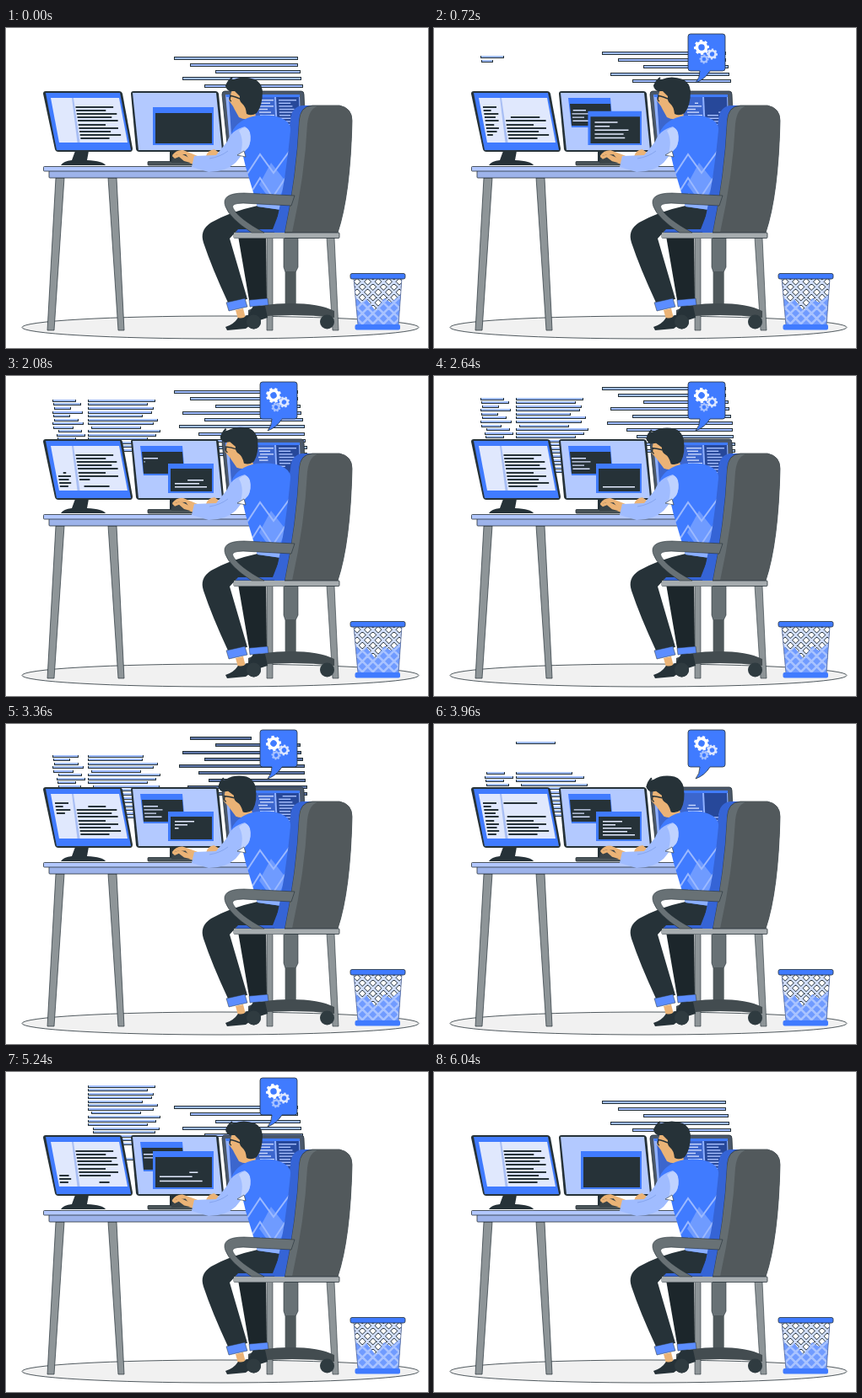
An HTML page with a canvas for the animation above (6.08 s loop, 500 by 380 pixels).

```html
<!DOCTYPE html>
<html>
<head>
<meta charset="utf-8">
<style>
html, body { margin: 0; width: 100%; height: 100%; overflow: hidden; background: #fff; }
canvas { display: block; }
</style>
</head>
<body>
<canvas id="stage" width="500" height="380"></canvas>
<script>
const c = document.getElementById('stage').getContext('2d');
const LOOP = 6080, HALF = LOOP / 2;
const DARK = '#263238', BLUE = '#407bff', PALE = '#a0bcff', SKIN = '#ebb376';
const clamp = v => Math.max(0, Math.min(1, v));
const ease = v => { v = clamp(v); return v * v * (3 - 2 * v); };
const ramp = (t, start, step, i) => clamp((t - start - i * step) / step);

function shape(d, fill, stroke, width = 0.8) {
  const p = new Path2D(d);
  if (fill) { c.fillStyle = fill; c.fill(p); }
  if (stroke) { c.strokeStyle = stroke; c.lineWidth = width; c.stroke(p); }
}
function rect(x, y, w, h, fill, r = 0, stroke) {
  c.beginPath();
  c.roundRect(x, y, w, h, r);
  c.fillStyle = fill;
  c.fill();
  if (stroke) { c.strokeStyle = stroke; c.lineWidth = 0.8; c.stroke(); }
}
function disc(x, y, r, fill) {
  c.beginPath();
  c.arc(x, y, r, 0, 7);
  c.fillStyle = fill;
  c.fill();
}
function clipped(d, draw) {
  c.save();
  c.clip(new Path2D(d));
  draw();
  c.restore();
}
function about(x, y, draw, angle = 0, scale = 1, dx = 0, dy = 0) {
  c.save();
  c.translate(x + dx, y + dy);
  c.rotate(angle);
  c.scale(scale, scale);
  c.translate(-x, -y);
  draw();
  c.restore();
}
// Old part of a line wiped from the left, new part typed from the left.
function codeLine(x, y, w, gone, typed, color, h = 1.7) {
  if (gone < 1) rect(x + w * gone, y, w * (1 - gone), h, color);
  if (typed > 0) rect(x, y, w * typed, h, color);
}

// Code floating up behind the screens
const wideRows = [[199, 346], [218, 346], [248, 349], [209, 350], [235, 352], [205, 354],
  [228, 354], [240, 355], [215, 357], [232, 357]];
const midEnds = [177, 168, 175, 173, 162, 180, 175, 160, 183, 178, 168, 182];
const sideEnds = [83, 89, 77, 91, 76, 86, 92, 80, 90, 94];

// Pixel-aligned bar: a crisp dark edge around a pale core.
function floatLine(x, y, w, h, fill) {
  if (w < 2) return;
  const top = Math.round(y - h / 2);
  w = Math.round(w);
  rect(x, top, w, h, DARK);
  rect(x + 1, h > 3 ? top + 1 : top, w - 2, h > 3 ? h - 2 : h - 1, fill);
}
function floatingCode(t) {
  const s = t > 3920 ? t - LOOP : t;
  const fill = s > 3000 ? '#5f76a8' : PALE;
  wideRows.forEach(([x, end], i) => {
    const typed = i < 5 ? ramp(s, -2080, 80, i) : ramp(s, 1500, 100, i - 5);
    const gone = ramp(s, 3260, 70, i);
    floatLine(x, 35.5 - 0.0079 * s + i * 8.25, (end - x) * typed * (1 - gone), 4, fill);
  });
  for (let i = 0; i < 20; i++) {
    const y = 37.5 - 0.0039 * t + i * 4.55;
    const gone = ramp(t, 2990, 118, i);
    const first = ramp(t, 880, 85, i) * (1 - gone);
    const second = ramp(t, 3910, 85, i) * (1 - ramp(t, 5240, 40, i));
    const x = 97 + (i % 8 == 7 ? 4 : 0) + (i > 10 ? 6 : 0);
    floatLine(x, y, (midEnds[i % 12] - x) * Math.max(first, second), 3, PALE);
    const sx = 55 + (i % 3) + (i > 7 ? 5 : 0);
    floatLine(sx, y, (sideEnds[i % 10] - sx) * ramp(t, 600, 85, i) * (1 - gone), 3, PALE);
  }
}

function stand(x) {
  about(0, 0, () => shape('M17 146H33L31 157Q50 158 53 163H0Q3 158 13 157Z', DARK), 0, 1, x);
}
function leftScreen(p) {
  stand(65);
  shape('M47 75H134Q137 75 138 78L150 143Q150 147 147 147H62Q59 147 58 144L44 78Q44 75 47 75Z', DARK);
  shape('M47 77H135L148 145H60Z', BLUE);
  shape('M53 83H134L144 136H63Z', '#e0e8fd');
  shape('M78 83H80L87.500 136H84.500Z', '#a9bff4');
  const right = [47, 37, 50, 43, 50, 34, 49, 39, 51, 36];
  const left = [16, 9, 17, 13, 16, 10, 15, 12, 14, 10];
  for (let i = 0; i < 10; i++) {
    const y = Math.round(93 + i * 4.1), skew = i * 0.65;
    codeLine(82.500 + skew, y, right[i] * 0.95, ramp(p, 0, 228, i), ramp(p, 760, 180, i), DARK, 2);
    const a = ramp(p, 1600, 85, i), b = ramp(p, 0, 85, i);
    if (b > a) rect(58 + skew + left[i] * a, y, left[i] * (b - a), 2, DARK);
  }
}
function middleScreen(t, p) {
  rect(194, 146, 13, 13, DARK);
  shape('M151 75H248Q251 75 252 78L258 143Q258 147 255 147H158Q155 147 154 144L148 78Q148 75 151 75Z', DARK);
  clipped('M150 77H249L256 145H157Z', () => {
    rect(148, 76, 110, 70, '#b3c9ff');
    if (t > 700 && t < 5700) {
      shape('M159 83H209L212 118H163Z', BLUE);
      shape('M161 90H209L211 116H163Z', DARK);
      [17, 22, 14, 20].forEach((w, i) =>
        codeLine(163 + i * 0.5, 97 + i * 4.2, w, ramp(p, 700, 200, i), ramp(p, 1900, 170, i), '#d8e2ff', 1.4));
    }
    const big = t < 2500 ? 1 - ease((t - 600) / 250) : ease((t - 4800) / 250);
    const x = 192 - 18 * big, y = 104 - 10 * big, w = 246 - x, h = 139 - y;
    rect(x, y, w, h, BLUE);
    rect(x + 3, y + 6 + big, w - 5, h - 8 - big, DARK);
    [23, 15, 34, 29, 38].forEach((len, i) => {
      const a = ramp(p, 1200, 360, i), b = ramp(p, 0, 150, i);
      const k = w / 54;
      if (b > a) rect(x + 8 + len * a * k, y + (11 + i * 4) * (h / 35), len * (b - a) * k, 1.5, '#e4ebff');
    });
  });
}
function backScreen(p) {
  shape('M259 75H350Q353 75 353 79L356 147H263L256 79Q256 75 259 75Z', '#4b586a', DARK);
  shape('M260 79H348L350 145H266Z', '#8fb0ff');
  shape('M260 79H348V82H261Z', BLUE);
  shape('M264 82H318L321 142H268Z', '#3c66cd');
  shape('M320 82H347L349 142H323Z', '#27489a');
  for (let i = 0; i < 12; i++) {
    const y = 85 + i * 3.6;
    codeLine(299 + i % 3, y, 18 - i * 5 % 8, ramp(p, 500, 130, i), ramp(p, 1700, 80, i), '#cbd9ff', 1.4);
    codeLine(323 + i * 0.2, y, 21 - i * 7 % 9, ramp(p, 300, 90, i), ramp(p, 1500, 90, i), '#a9c1ff', 1.4);
  }
}

function desk() {
  shape('M59 178H69L57 359H49Z', '#8e9598', DARK, 0.7);
  shape('M121 178H131L140 359H133Z', '#8e9598', DARK, 0.7);
  rect(51, 169.500, 260, 8.500, '#9db3ea', 1, DARK);
  rect(44.500, 164.500, 266, 5.500, '#b3c8ff', 1, DARK);
}
function bin() {
  const body = 'M412 297H469L465 353H417Z';
  const paper = 'M412 318L421 327L427 322L438 336L448 321L456 326L470 315V354H412Z';
  let mesh = '';
  for (let x = 341; x < 540; x += 12.5) mesh += `M${x} 295l60 60M${x} 295l-60 60`;
  clipped(body, () => {
    shape(mesh, null, DARK, 4);
    shape(mesh, null, '#d3e0ff', 2.6);
    clipped(paper, () => {
      rect(410, 310, 62, 45, '#709bff');
      shape(mesh, null, '#a9c3ff', 2.6);
    });
  });
  shape(body, null, '#53699c', 0.8);
  rect(408, 291.500, 65, 6.500, BLUE, 2, DARK);
  rect(413.500, 352, 53.500, 6.500, BLUE, 2);
}

function chairBack() {
  shape('M309 249H316V359H309Z', '#8e9598', DARK, 0.6);
  shape('M380 249H389L394 359H387Z', '#8e9598', DARK, 0.6);
  shape('M329 249H346V284L343 290V329H331V290L329 284Z', '#687175', DARK, 0.6);
  rect(331, 289, 12.500, 40, '#4f585b');
}
function chairFront() {
  shape('M272 243Q274 235 286 235L312 236L320 210L337 110Q338 93 352 92H368L340 243Z', '#3564d6');
  shape('M330 243Q344 175 347 111Q348 93 363 92H395Q410 95 410 110Q408 198 393 243Z', '#646d71', DARK, 0.7);
  shape('M339 243Q354 175 357 114Q359 94 372 92H395Q410 95 410 110Q408 198 393 243Z', '#52595c');
  rect(270, 243, 125, 6.500, '#a6acaf', 1, DARK);
  shape('M287 335Q303 327 337 327Q371 327 389 336V344Q340 338 287 344Z', '#434c50');
  disc(293.500, 349, 8.500, '#2f3b40');
  disc(380.500, 349, 8.500, '#2f3b40');
}
function armrest() {
  shape('M342 199L282 196Q254 196 260 212Q265 226 291 243H306Q275 226 269 214Q266 208 281 208L338 211Z', '#687175', DARK, 0.6);
}

function legs() {
  shape('M275 247H308L309 323H288Z', '#1c262b');
  shape('M293 330H307L310 344L285 352L284 346Z', DARK);
  shape('M298 211L326 213L316 239H275L265 250L286 322L263 326Q244 285 234 255Q229 240 243 231Q266 218 298 211Z', DARK);
  shape('M261 326L283 321L286 331L264 336Z', '#5c8dff', DARK, 0.5);
  shape('M288 323L310 321L311 329L289 331Z', '#5c8dff', DARK, 0.5);
  shape('M272 335L281 333L284 345L275 346Z', SKIN);
  shape('M260 355Q270 352 275 344Q281 346 285 341L297 342L292 351L284 357L262 359Z', DARK);
}
function torso() {
  const vest = 'M267 125Q274 108 297 104Q318 102 330 109Q339 114 338 128L326 216L298 212L284 165L278 140Z';
  shape(vest, BLUE);
  clipped(vest, () => {
    shape('M300 186L314 160L332 183L319 212Z', '#6f9bff');
    shape('M296 203L302 196L312 210L326 206V218H296Z', '#8bafff');
    shape('M284 176L301 150L317 172L336 146M288 199L301 178L316 201L335 172', null, '#9bb9ff', 2);
  });
}
function hands(t) {
  const beat = Math.sin(t * Math.PI / 190);
  about(246, 152, () => shape('M237 152Q239 145 247 144L255 150L245 155Z', SKIN), beat * 0.08);
  about(222, 158, () => {
    shape('M197 151Q202 144 210 145L227 152L222 162L209 157L199 156Z', SKIN);
    shape('M196 159Q197 151 204 150H213L219 158L220 160H196Z', '#3a4448');
    shape('M197 152L207 149L217 154L222 161L211 158L205 153L200 155Z', SKIN);
  }, beat * 0.05);
}
function arm() {
  shape('M283 117Q267 121 262 135L249 151L223 152L220 165L240 171Q260 171 272 160L288 140Q293 124 283 117Z', PALE);
  shape('M280 119Q286 116 289 124Q291 134 287 142L277 152Q283 134 276 122Z', '#bfd2ff');
  shape('M241 155Q254 153 263 146', null, '#7e9fea', 0.8);
  shape('M274 151L282 146L284 153Z', '#fff', DARK, 0.6);
}
function head(t) {
  const lean = ease((t - 1560) / 800) - ease((t - 4540) / 640);
  about(288, 104, () => {
    shape('M268 73L264 86L269 93L271 97L276 106Q285 111 296 105L291 80Z', SKIN);
    shape('M265 75Q257 70 262 66Q263 61 270 61Q281 56 295 61Q303 65 304 75Q304 92 297 101Q291 105 285 102Q284 93 280 90Q276 87 277 81L271 75Z', DARK);
    shape('M265 80L272 82L277 84M266 81Q264 86 267 87', null, DARK, 1.400);
    shape('M261 69Q263 63 268 59', null, DARK, 2.200);
  }, -0.14 * lean, 1, -4 * lean, 2 * lean);
}

function gear(x, y, r, color, angle) {
  about(x, y, () => {
    c.strokeStyle = color;
    c.lineWidth = r * 0.4;
    c.beginPath();
    c.arc(x, y, r * 0.62, 0, 7);
    c.stroke();
    c.fillStyle = color;
    for (let i = 0; i < 8; i++)
      about(x, y, () => c.fillRect(x - r * 0.18, y - r, r * 0.36, r * 0.35), i * Math.PI / 4);
  }, angle);
}
function bubble(t) {
  const size = ease((t - 520) / 180) * (1 - ease((t - 5800) / 220));
  if (size < 0.01) return;
  about(315, 62, () => {
    shape('M304 7H342Q345 7 345 10V48Q345 51 342 51H327Q321 61 310 65Q315 59 315 51H304Q301 51 301 48V10Q301 7 304 7Z', BLUE, DARK);
    const a = t / LOOP * Math.PI * 4;
    gear(317, 23, 9, '#fff', a);
    gear(329.500, 31, 6.500, '#dce6ff', -a);
    gear(320, 37, 5.500, '#a6c1ff', -a);
  }, 0, size);
}

function draw(t) {
  const p = t % HALF;
  c.fillStyle = '#fff';
  c.fillRect(0, 0, 500, 380);
  c.beginPath();
  c.ellipse(254, 355.500, 235, 13.500, 0, 0, 7);
  c.fillStyle = '#f1f1f1';
  c.fill();
  c.strokeStyle = DARK;
  c.lineWidth = 0.8;
  c.stroke();
  floatingCode(t);
  backScreen(p);
  leftScreen(p);
  middleScreen(t, p);
  rect(168, 158.500, 54, 4.500, '#4a5458', 1, DARK);
  desk();
  bin();
  chairBack();
  chairFront();
  legs();
  disc(293.500, 349, 8.500, '#2f3b40');
  shape('M270 243H330V249.500H270Z', '#a6acaf');
  hands(t);
  head(t);
  torso();
  arm();
  // The chair edge and armrest stay in front of the vest.
  shape('M338 112Q340 94 352 92H358Q348 95 347 111Q344 175 330 243H318Q332 180 338 112Z', '#3564d6');
  armrest();
  bubble(t);
}
function tick() {
  draw(Math.floor(performance.now() % LOOP / 40) * 40);
  requestAnimationFrame(tick);
}
tick();
</script>
</body>
</html>
```
